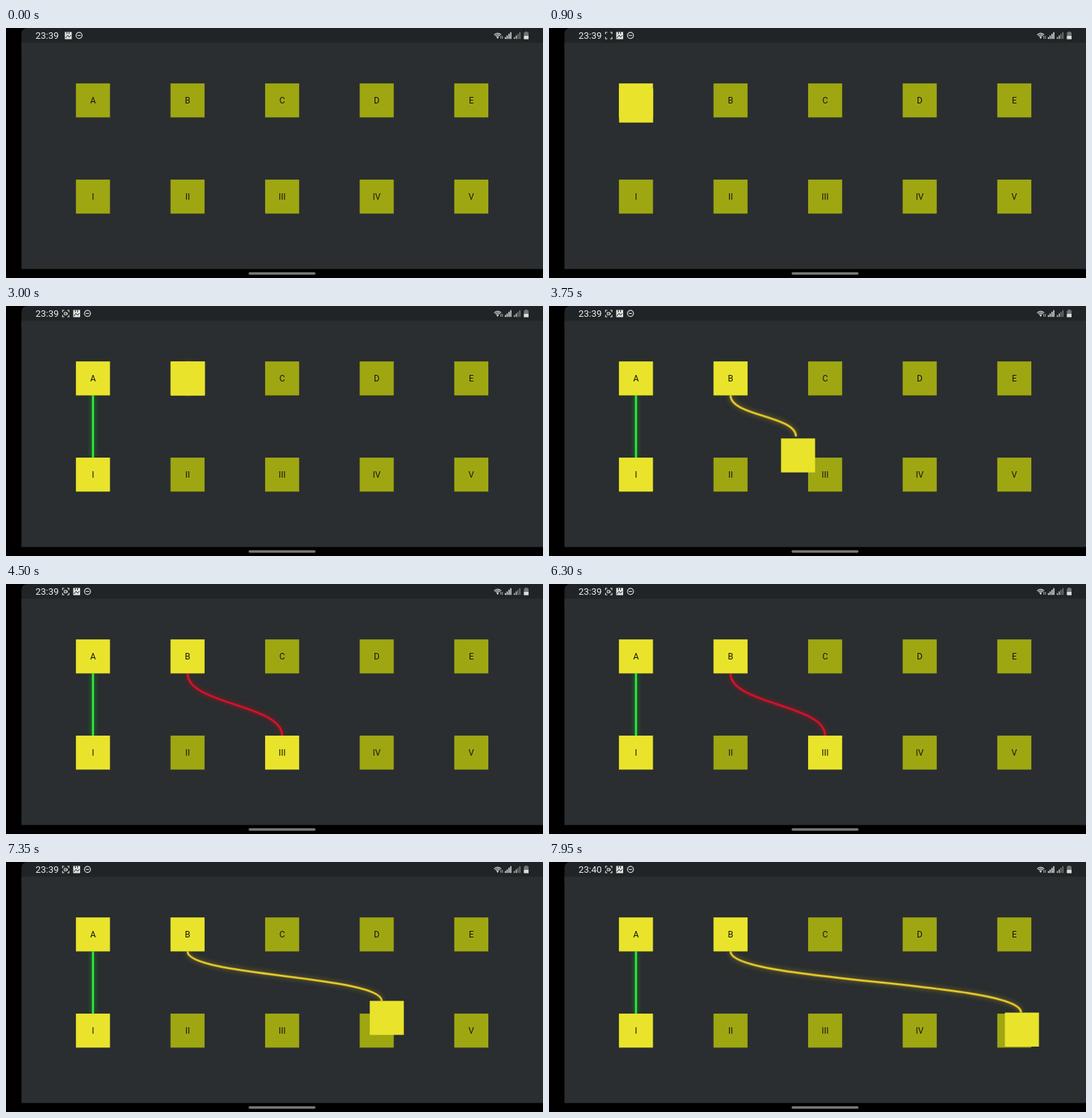
These frames come from a looping animation (746 px wide and 348 px high, 8000 ms). An HTML page with a canvas:

```html
<!DOCTYPE html>
<html lang="en">
<head>
<meta charset="utf-8">
<title>Matching pairs</title>
<style>
html, body { margin: 0; width: 100%; height: 100%; overflow: hidden; background: #000; }
canvas { display: block; }
</style>
</head>
<body>
<canvas id="stage" width="746" height="348"></canvas>
<script>
const c = document.getElementById('stage').getContext('2d');
const LOOP = 8000, STEP = 150, SIZE = 47.3;
const DIM = '#9ea712', LIT = '#e9e42b';
const TOP = [...'ABCDE'], BOTTOM = ['I', 'II', 'III', 'IV', 'V'];
const colX = i => 120.8 + i * 131.4;
const ROW_TOP = 100.8, ROW_BOTTOM = 234.7;

// Each drag: start, drop, upper box, key points [time, x, y] of the dragged square's centre.
const drags = [
  { from: 750, to: 1800, box: 0, path: [[750, 121, 101], [900, 121, 108], [1200, 120, 174], [1500, 119, 233.3], [1800, 120, 234]] },
  { from: 3000, to: 4350, box: 1, path: [[3000, 252.8, 101], [3150, 255, 107], [3450, 288, 152], [3750, 346, 208], [4050, 382, 232], [4350, 384, 234]] },
  { from: 6600, to: LOOP, box: 1, path: [[6600, 252.8, 101], [6900, 310, 156], [7200, 459, 216.5], [7350, 529, 217], [7500, 590, 221], [7650, 633, 228], [7950, 657, 233.3]] }
];
// Finished links: visible span, upper box, lower box, colour.
const links = [
  { from: 1800, to: LOOP, a: 0, b: 0, color: '#35f03c', glow: '#12c52c' },
  { from: 4350, to: 6600, a: 1, b: 2, color: '#d51428', glow: '#c01028' }
];
const active = (o, t) => t >= o.from && t < o.to;

function along(path, t) {
  if (t <= path[0][0]) return path[0].slice(1);
  const i = path.findIndex(p => p[0] >= t);
  if (i < 0) return path[path.length - 1].slice(1);
  const [t0, x0, y0] = path[i - 1], [t1, x1, y1] = path[i];
  const k = (t - t0) / (t1 - t0);
  return [x0 + (x1 - x0) * k, y0 + (y1 - y0) * k];
}

function rect(x, y, w, h, color) {
  c.fillStyle = color;
  c.fillRect(x, y, w, h);
}

function square(x, y, color, label = '') {
  rect(x - SIZE / 2, y - SIZE / 2, SIZE, SIZE, color);
  c.fillStyle = '#15170a';
  c.font = '12px Roboto, sans-serif';
  c.textAlign = 'center';
  c.fillText(label, x, y + 4.3);
}

function wire(x0, y0, x1, y1, color, glow) {
  const mid = (y0 + y1) / 2;
  c.save();
  c.beginPath();
  c.moveTo(x0, y0);
  c.bezierCurveTo(x0, mid, x1, mid, x1, y1);
  c.shadowColor = c.strokeStyle = glow;
  c.shadowBlur = 7;
  c.globalAlpha = 0.5;
  c.lineWidth = 4;
  c.stroke();
  c.shadowBlur = 0;
  c.globalAlpha = 1;
  c.strokeStyle = color;
  c.lineWidth = 2.2;
  c.stroke();
  c.restore();
}

function line(color, width, ...runs) {
  c.strokeStyle = color;
  c.lineWidth = width;
  c.beginPath();
  for (const [x, y, ...rest] of runs) {
    c.moveTo(x, y);
    for (let i = 0; i < rest.length; i += 2) c.lineTo(rest[i], rest[i + 1]);
  }
  c.stroke();
}

function arc(x, y, r, a = 0, b = Math.PI * 2) {
  c.beginPath();
  c.arc(x, y, r, a, b);
}

function frameIcon(x, filled) {
  const y = 6, e = 9, s = 2.5;
  line('#ddd', 1.1,
    [x, y + s, x, y, x + s, y], [x + e - s, y, x + e, y, x + e, y + s],
    [x + e, y + e - s, x + e, y + e, x + e - s, y + e], [x + s, y + e, x, y + e, x, y + e - s]);
  if (!filled) return;
  c.strokeRect(x + 2.5, y + 3, 3.2, 3.2);
  rect(x + 6, y + 3.7, 1.4, 2, '#ddd');
}

function pictureIcon(x) {
  rect(x, 5.5, 9.6, 10, '#e4e4e4');
  line('#202426', 1, [x + 3, 5.5, x + 3, 8.5], [x + 6, 5.5, x + 6, 8.5],
    [x + 1, 14, x + 4, 10, x + 6, 13, x + 8.5, 10]);
}

function statusBar(t) {
  const recording = t >= 300, shift = recording ? 11.7 : 0;
  c.fillStyle = '#eee';
  c.font = '13px Roboto, sans-serif';
  c.textAlign = 'left';
  c.fillText(t < 7650 ? '23:39' : '23:40', 41, 15.2);
  if (recording) frameIcon(78.5, t >= 2250);
  pictureIcon(81.7 + shift);
  const x = 101.5 + shift;
  line('#ddd', 1.2, [x - 2.3, 10.4, x + 2.3, 10.4]);
  arc(x, 10.4, 4.2);
  c.stroke();

  for (const r of [2.2, 4.4, 6.6]) {
    arc(683, 14, r, -2.4, -0.75);
    c.stroke();
  }
  arc(683, 13.6, 1.1);
  c.fillStyle = '#ddd';
  c.fill();
  line('#aaa', 1, [687.5, 11, 687.5, 15], [689.7, 11, 689.7, 15]);
  for (let i = 0; i < 4; i++) {
    const h = 2.5 + i * 2.3;
    rect(693 + i * 2.5, 15.2 - h, 1.6, h, '#ddd');
    rect(705.5 + i * 2.5, 15.2 - h, 1.6, h, i < 2 ? '#bbb' : '#75797a');
  }
  rect(721, 5, 3.4, 1.5, '#777');
  rect(719.5, 6.2, 6.4, 9.3, '#777');
  rect(719.5, 11, 6.4, 4.5, '#ddd');
}

function draw(t) {
  rect(0, 0, 746, 348, '#000');
  c.fillStyle = '#202426';
  c.beginPath();
  c.roundRect(21.5, 0, 725, 30, [8, 0, 0, 0]);
  c.fill();
  rect(21.5, 20.5, 724.5, 315, '#2a2e30');
  statusBar(t);
  c.fillStyle = '#777';
  c.beginPath();
  c.roundRect(337, 340, 93, 3.4, 1.7);
  c.fill();

  const drag = drags.find(d => active(d, t));
  const shown = links.filter(l => active(l, t));
  const edgeA = ROW_TOP + SIZE / 2, edgeB = ROW_BOTTOM - SIZE / 2;
  for (const l of shown) wire(colX(l.a), edgeA, colX(l.b), edgeB, l.color, l.glow);
  if (drag) {
    // The wire trails slightly behind the dragged square.
    const [x, y] = along(drag.path, t - 15);
    wire(colX(drag.box), edgeA, x, y - SIZE / 2, '#e8cd30', '#b89a1c');
  }
  for (let i = 0; i < 5; i++) {
    const litTop = shown.some(l => l.a === i) || (drag && drag.box === i);
    const litBottom = shown.some(l => l.b === i);
    square(colX(i), ROW_TOP, litTop ? LIT : DIM, TOP[i]);
    square(colX(i), ROW_BOTTOM, litBottom ? LIT : DIM, BOTTOM[i]);
  }
  if (drag) square(...along(drag.path, t), LIT);
}

function tick() {
  const t = performance.now() % LOOP;
  draw(Math.floor(t / STEP) * STEP);
  requestAnimationFrame(tick);
}
tick();
</script>
</body>
</html>
```
